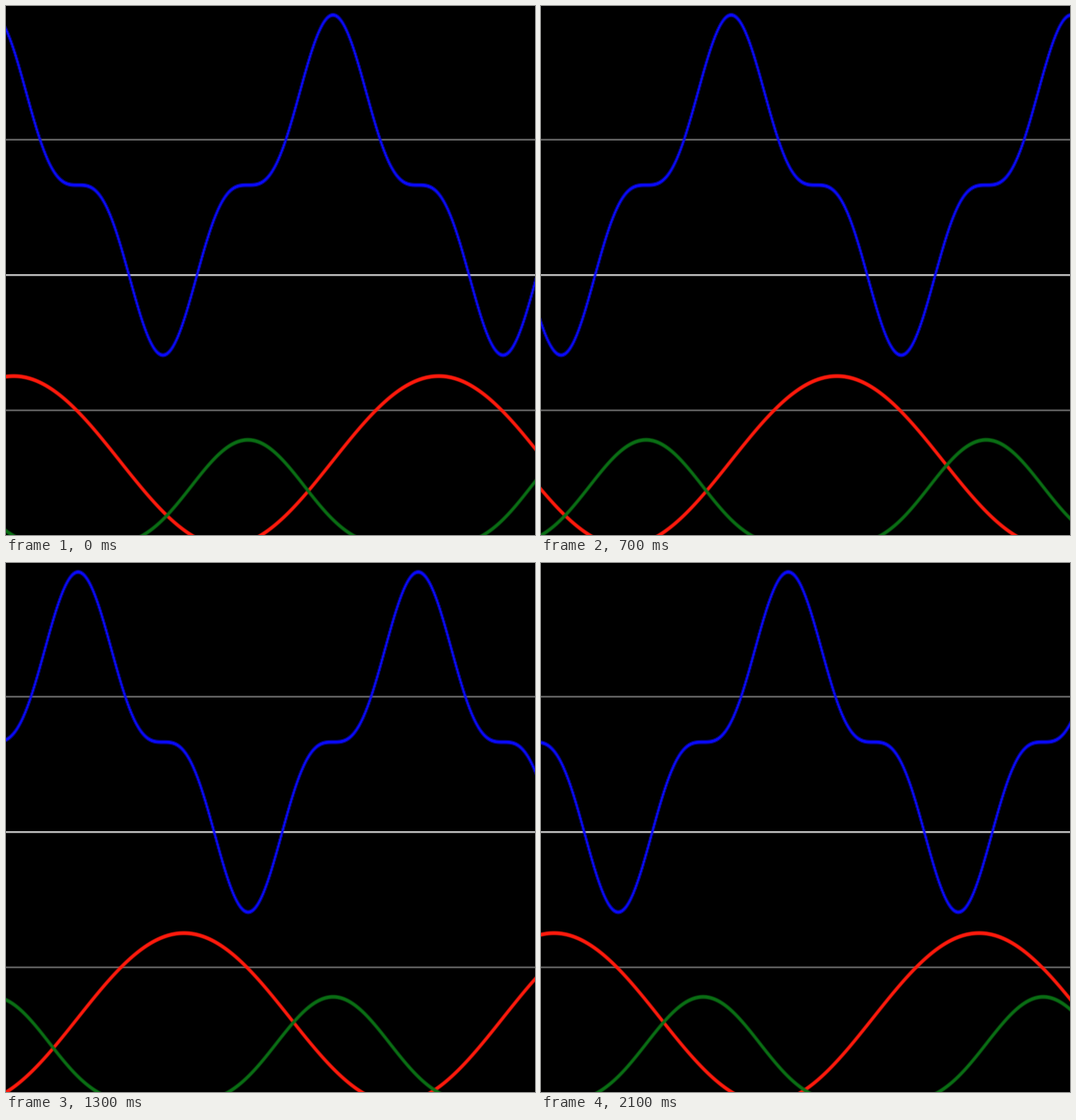
Write a matplotlib script that moves like this. It is 550x550 px and loops after 2200 ms.

```python
import numpy as np
import matplotlib.pyplot as plt
from matplotlib.animation import FuncAnimation
from matplotlib.patches import Polygon

SIZE, DPI = 550, 100
FRAMES, INTERVAL = 22, 100
PX = 72 / DPI      # one pixel in points
U = 88.4           # pixels per unit
BASE = 561.6       # floor of the lower waves, just below the stage

# Leftward travel in pixels; the waves speed up slightly near the end
KEY_STEPS = [0, 5, 9, 13, 15, 19, 21]
KEY_SHIFTS = [0, 101.5, 183, 265, 307, 390.5, 436.5]

x = np.arange(-4, SIZE + 4, 0.5)


def cos_wave(peak, period):
    return np.cos(2 * np.pi * (x - peak) / period)


def red_wave(shift):
    return BASE - U * (1 + cos_wave(450 - shift, 5 * U))


def green_wave(shift):
    c = cos_wave(251.5 - shift, 4 * U)
    return BASE - 1.25 * U * ((1 + c) / 2) ** 2


def blue_wave(shift):
    return 186.2 - 2 * U * cos_wave(340 - shift, 4 * U) ** 3


def ribbon(y, half=0.8):
    """Outline of a band with constant vertical thickness."""
    top = np.column_stack([x, y - half])
    bottom = np.column_stack([x, y + half])
    return np.vstack([top, bottom[::-1]])


fig = plt.figure(figsize=(SIZE / DPI, SIZE / DPI), dpi=DPI, facecolor="black")
ax = fig.add_axes([0, 0, 1, 1])
ax.set_xlim(0, SIZE)
ax.set_ylim(SIZE, 0)
ax.axis("off")

for y, color in [(139, "0.42"), (279.7, "0.86"), (420.4, "0.42")]:
    ax.axhline(y, color=color, lw=1.7 * PX, snap=False, zorder=1)


def add_band(y, color, width, alpha):
    band = Polygon(ribbon(y), closed=True, fc=color, ec=color, alpha=alpha,
                   lw=width * PX, joinstyle="round", zorder=2)
    return ax.add_patch(band)


# Each wave is a soft wide band under a thin solid one
waves = []
for func, color, core in [(red_wave, "#ff1a0c", 1.7),
                          (green_wave, "#0a6e14", 1.5),
                          (blue_wave, "#0a0aff", 0.9)]:
    for width, alpha in [(3, 0.5), (core, 1)]:
        waves.append((func, add_band(func(0), color, width, alpha)))


def update(i):
    shift = np.interp(i, KEY_STEPS, KEY_SHIFTS)
    for func, band in waves:
        band.set_xy(ribbon(func(shift)))
    return [band for _, band in waves]


anim = FuncAnimation(fig, update, frames=FRAMES, interval=INTERVAL,
                     repeat=True, repeat_delay=0, blit=False)
plt.show()
```
